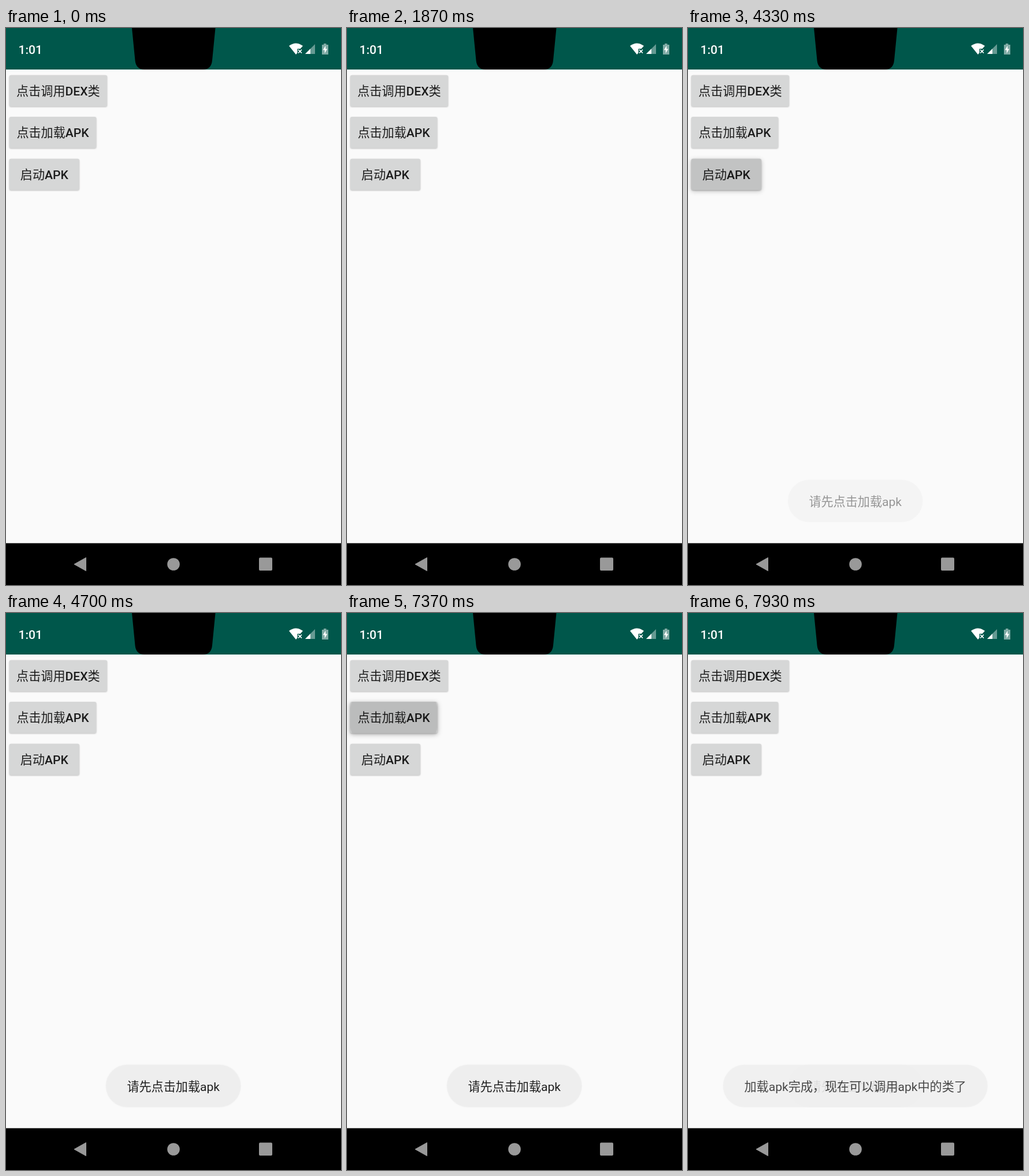
Animation of 580 by 966 pixels, one loop 8000 ms. Source, as an HTML page:

```html
<!DOCTYPE html>
<html lang="zh-CN">
<head>
<meta charset="utf-8">
<title>APK loader</title>
<style>
  html, body { margin: 0; width: 100%; height: 100%; overflow: hidden; background: #fafafa; }
  svg { display: block; width: 580px; height: 966px; }
  text { font: 400 21.1px Roboto, "Noto Sans CJK SC", "Noto Sans CJK", sans-serif; fill: #000; fill-opacity: .87; text-anchor: middle; }
  .latin { font-weight: 500; }
  .clock { font-weight: 500; fill: #fff; fill-opacity: 1; text-anchor: start; }
  .face { fill: #d6d7d7; filter: drop-shadow(0 1px 1px rgba(0, 0, 0, .24)); }
  .lift { fill: #d6d7d7; opacity: 0; filter: drop-shadow(0 2px 4px rgba(0, 0, 0, .32)); }
  .wash { opacity: 0; }
  .pill { fill: #eee; filter: drop-shadow(0 0 1px rgba(0, 0, 0, .06)); }
  .toast { opacity: 0; }
  .nav { fill: #999; }
</style>
</head>
<body>
<svg viewBox="0 0 580 966">
  <rect width="580" height="966" fill="#fafafa"/>
  <rect width="580" height="72" fill="#00574b"/>
  <path d="M218 0 L223.500 56 Q225 72 240 72 H341 Q355.500 72 357 56 L362.500 0 Z"/>
  <text class="clock" x="21.500" y="45">1:01</text>

  <g fill="#fff">
    <path d="M490 31 Q502 22 514 31 L509.500 36 H504.500 V43 L502 46 Z"/>
    <path d="M506 37.500 L512 43.500 M512 37.500 L506 43.500" stroke="#fff" stroke-width="1.700"/>
    <path d="M518 45 L535 28 V45 Z" opacity=".4"/>
    <path d="M518 45 L527 36 V45 Z"/>
    <path d="M550 27 H554.500 V29 H558 V46 H547 V29 H550 Z" opacity=".5"/>
    <path d="M553.300 30.500 L548.800 38.300 H551.700 V44 L556.200 36.200 H553.300 Z"/>
  </g>

  <g id="buttons"></g>
  <g id="toasts"></g>

  <rect y="893.500" width="580" height="72.500"/>
  <g class="nav">
    <path d="M118 930 L138.500 918.500 V941.500 Z" stroke="#999" stroke-linejoin="round"/>
    <circle cx="290" cy="930" r="10.800"/>
    <rect x="438" y="918.500" width="23" height="22.500" rx="2"/>
  </g>
</svg>
<script>
const LOOP = 8000;
const DECELERATE = "cubic-bezier(.333,.667,.667,1)";
const $ = id => document.getElementById(id);

// Each step is [time in ms, value, easing towards the next step].
function play(element, property, steps) {
  const frames = [[0, steps[0][1]], ...steps, [LOOP, steps.at(-1)[1]]];
  element.animate(
    frames.map(([time, value, easing = "linear"]) => ({ offset: time / LOOP, [property]: value, easing })),
    { duration: LOOP, iterations: Infinity }
  );
}

function addGroup(parent, markup, className = "") {
  const group = document.createElementNS("http://www.w3.org/2000/svg", "g");
  group.setAttribute("class", className);
  group.innerHTML = markup;
  parent.append(group);
  return group;
}

function addButton(y, width, label, press) {
  const x = 5.7, height = 54.3, cx = x + width / 2, cy = y + height / 2;
  const box = `x="${x}" y="${y}" width="${width}" height="${height}" rx="3"`;
  const clip = `clip${Math.round(y)}`;
  const button = addGroup($("buttons"), `
    <clipPath id="${clip}"><rect ${box}/></clipPath>
    <rect class="lift" ${box}/>
    <rect class="face" ${box}/>
    <g clip-path="url(#${clip})">
      <g class="wash">
        <rect ${box} fill-opacity=".045"/>
        <g transform="translate(${cx} ${cy})"><circle class="ripple" r="${Math.hypot(width, height) / 2}" fill-opacity=".085"/></g>
      </g>
    </g>
    <text x="${cx}" y="${y + 35.2}">${label}</text>`);
  if (!press) return;
  const { down, up } = press;
  const hold = [[down, 0], [down + 80, 1], [up, 1], [up + 230, 0]];
  play(button.querySelector(".lift"), "opacity", hold);
  play(button.querySelector(".wash"), "opacity", hold);
  play(button.querySelector(".ripple"), "transform",
    [[down, "scale(0)", DECELERATE], [down + 225, "scale(1)"]]);
}

function addToast(width, label, opacity) {
  const toast = addGroup($("toasts"), `
    <rect class="pill" x="${289.7 - width / 2}" y="783.7" width="${width}" height="73" rx="36.500"/>
    <text x="289.700" y="828.500">${label}</text>`, "toast");
  play(toast, "opacity", opacity);
}

const latin = word => `<tspan class="latin">${word}</tspan>`;

addButton(81.7, 169.4, `点击调用${latin("DEX")}类`);
addButton(154, 150.6, `点击加载${latin("APK")}`, { down: 7185, up: 7630 });
addButton(226.7, 121.2, `启动${latin("APK")}`, { down: 4070, up: 4270 });

addToast(233, "请先点击加载apk", [[4200, 0, DECELERATE], [4700, 1], [7650, 1], [LOOP - 1, .35]]);
addToast(457.5, "加载apk完成，现在可以调用apk中的类了", [[7650, 0, DECELERATE], [LOOP - 1, .85]]);
</script>
</body>
</html>
```
